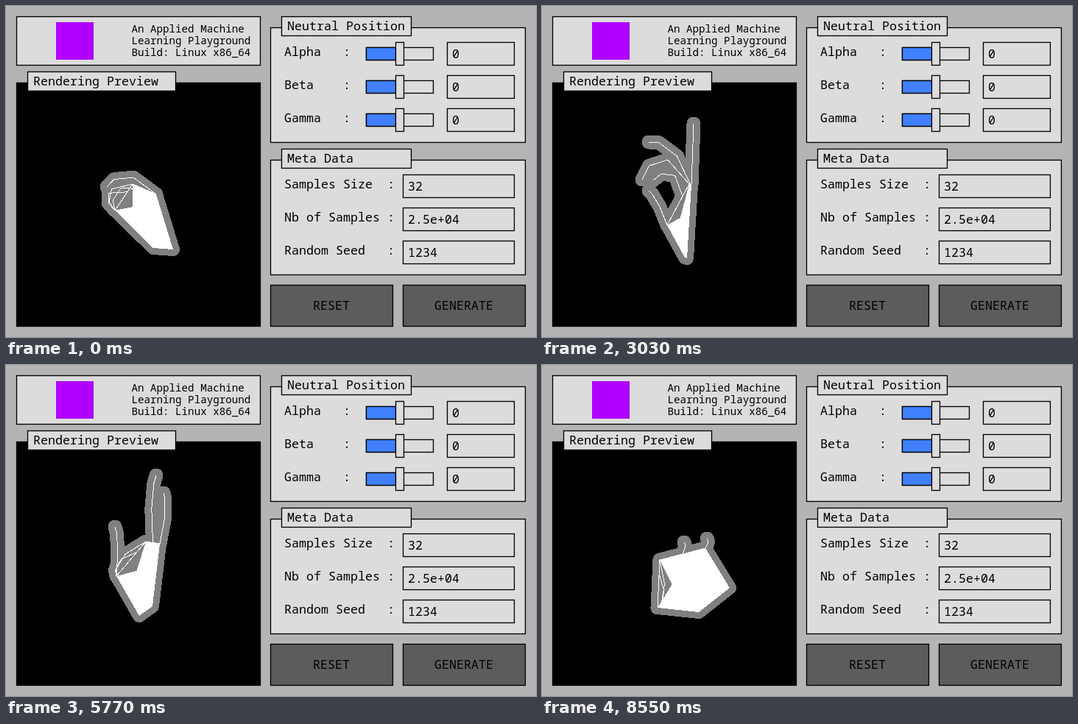
These frames come from a looping animation (720 px wide and 450 px high, 8.65 s). An HTML page:

```html
<!DOCTYPE html>
<html lang="en">
<head>
<meta charset="utf-8">
<title>Hand preview</title>
<style>
  html, body { margin: 0; width: 100%; height: 100%; overflow: hidden; background: #b4b4b4; }
  svg { display: block; }
  text { font: 16.67px "Noto Sans Mono", "DejaVu Sans Mono", monospace; white-space: pre; }
  .small { font-size: 14.2px; }
  .mid { text-anchor: middle; }
  .box { stroke: #000; stroke-width: 1.33; }
  #hand path { stroke-linejoin: round; stroke-linecap: round; shape-rendering: crispEdges; }
</style>
</head>
<body>
<svg width="720" height="450" viewBox="0 0 720 450">
  <g id="ui"></g>
  <g id="hand">
    <path id="halo" fill="#808080" stroke="#808080" stroke-width="18"/>
    <path id="reach" fill="none" stroke="#808080" stroke-width="19"/>
    <path id="palm" fill="#fff"/>
    <path id="bones" fill="none" stroke="#fff"/>
  </g>
  <g id="front"></g>
</svg>
<script>
const PANEL = '#dcdcdc', BLUE = '#4080ff', BUTTON = '#5c5c5c';
const LOOP = 8650, LAST = 8550, STEPS = 212, CENTRE = [180, 270];
const $ = id => document.getElementById(id);

// Interface

const box = (x, y, w, h, fill = PANEL) =>
  `<rect class="box" x="${x + .5}" y="${y + .5}" width="${w}" height="${h}" fill="${fill}"/>`;
const text = (x, y, s, cls = '') => `<text x="${x}" y="${y}" class="${cls}">${s}</text>`;
const title = (x, y, w, s) => box(x, y, w, 26) + text(x + 8, y + 19, s);
const field = (x, y, w, s) => box(x, y, w, 31) + text(x + 7, y + 22, s);

let ui = box(14, 14, 331, 66) + '<rect x="68" y="22" width="51" height="51" fill="#b000ff"/>';
['An Applied Machine', 'Learning Playground', 'Build: Linux x86_64'].forEach((s, i) =>
  ui += text(170.5, 36 + 16 * i, s, 'small'));
ui += box(14, 104, 331, 331, '#000');

ui += box(359, 29, 346, 156) + title(374, 14, 176, 'Neutral Position');
['Alpha', 'Beta', 'Gamma'].forEach((s, i) => {
  const y = 49 + 45 * i;
  ui += text(378, y + 19, s.padEnd(8) + ':') + box(489, y + 7, 91, 17) +
    box(489, y + 7, 40, 17, BLUE) + box(529, y, 11, 31) + field(599, y, 91, '0');
});

ui += box(359, 209, 346, 156) + title(374, 194, 176, 'Meta Data');
[['Samples Size', '32'], ['Nb of Samples', '2.5e+04'], ['Random Seed', '1234']].forEach(([s, v], i) => {
  const y = 229 + 45 * i;
  ui += text(378, y + 19, s.padEnd(14) + ':') + field(539, y, 151, v);
});

['RESET', 'GENERATE'].forEach((s, i) => {
  const x = 359 + 180 * i;
  ui += box(x, 379, 166, 56, BUTTON) + text(x + 83, 413, s, 'mid');
});
$('ui').innerHTML = ui;
$('front').innerHTML = title(29, 89, 201, 'Rendering Preview');

// Hand

const add = (p, q, k = 1) => [p[0] + q[0] * k, p[1] + q[1] * k];
const sub = (p, q) => add(p, q, -1);
const lerp = (p, q, k) => add(p, sub(q, p), k);
const spin = ([x, y], a) => [x * Math.cos(a) - y * Math.sin(a), x * Math.sin(a) + y * Math.cos(a)];
const unit = ([x, y]) => {
  const len = Math.hypot(x, y) || 1;
  return [x / len, y / len];
};

// Three bones from base to tip, bowed to one side.
function finger(base, tip, bow) {
  const side = spin(unit(sub(tip, base)), Math.PI / 2);
  return [base, add(lerp(base, tip, .5), side, bow),
    add(lerp(base, tip, .88), side, bow * .65), tip];
}

// Corners: both sides of the wrist, then the low, middle and high knuckle.
// Fingers by place: [tip x, tip y, bow]; the others curl back to the low knuckle.
// Points are kept with the wrist turned to the positive x axis.
function pose(corners, curl, fingers) {
  const [w1, w2, low, mid, high] = corners.split(' ').map(s => s.split(',').map(Number));
  const edge = lerp(low, mid, .5);
  const notch = add(edge, unit(sub(w1, edge)), 18);
  const bases = [low, lerp(low, mid, .7), mid, lerp(mid, high, .5), high];
  const chains = bases.flatMap((base, i) => {
    const [x, y, bow] = fingers[i] || [...low, curl];
    return finger(base, [x, y], bow);
  });
  const [wx, wy] = sub(lerp(w1, w2, .5), CENTRE);
  const angle = Math.atan2(wy, wx);
  const pts = [w1, w2, low, notch, mid, high, ...chains];
  return { angle, pts: pts.map(p => spin(sub(p, CENTRE), -angle)) };
}

const closed = pose('227,331 200,329 148,278 172,242 204,256', 20, { 4: [137, 246, 18] });
const flat = pose('262,268 241,290 197,295 158,288 163,281', 0,
  { 0: [194, 309, 15], 1: [184, 334, 19], 2: [144, 354, 25], 3: [78, 313, 3] });
const pinch = pose('197,343 194,342 170,298 200,242 203,243', 0,
  { 0: [145, 251, 3], 1: [151, 237, 20], 2: [136, 236, 30], 3: [145, 185, 14], 4: [206, 160, 0] });
const horns = pose('200,338 153,327 151,262 189,235 238,270', 0,
  { 0: [179, 205, 0], 1: [192, 196, 0], 2: [190, 196, 3], 3: [215, 221, 3], 4: [264, 196, -4] });
const upright = pose('199,328 181,341 150,287 190,240 209,243', 10,
  { 0: [148, 220, 3], 3: [204, 150, -4], 4: [214, 174, 4] });
const claw = pose('233,328 203,318 179,291 168,250 178,246', 25,
  { 3: [106, 254, 18], 4: [109, 205, 8] });
const facing = pose('255,303 213,336 157,330 160,265 222,249', -8,
  { 3: [193, 241, 2], 4: [224, 236, 2] });

// time, pose, extra turn in degrees
const keys = [
  [0, closed, 0], [1140, flat, 0], [1780, flat, -4], [3030, pinch, 0], [3650, claw, -18],
  [4600, horns, 0], [5100, upright, 40], [5770, upright, 0], [6260, upright, -35],
  [6800, pinch, 8], [7500, claw, 0], [7800, claw, -18], [LAST, facing, 0]
];

function handAt(t) {
  const i = Math.max(1, keys.findIndex(k => t <= k[0]));
  const [t0, a, turnA] = keys[i - 1], [t1, b, turnB] = keys[i];
  const u = (t - t0) / (t1 - t0), k = u * u * (3 - 2 * u);
  const from = a.angle + turnA * Math.PI / 180, to = b.angle + turnB * Math.PI / 180;
  const angle = from + (to - from) * k;
  return a.pts.map((p, j) => add(spin(lerp(p, b.pts[j], k), angle), CENTRE));
}

const line = pts => 'M' + pts.map(p => p.map(v => v.toFixed(1))).join('L');

function draw(t) {
  const pts = handAt(t), palm = line(pts.slice(0, 6)) + 'Z';
  const chains = [6, 10, 14, 18, 22].map(i => pts.slice(i, i + 4));
  const bones = chains.map(line).join('') + line(chains.map(c => c[0]));
  $('halo').setAttribute('d', palm);
  $('palm').setAttribute('d', palm);
  $('reach').setAttribute('d', bones);
  $('bones').setAttribute('d', bones);
}

function tick() {
  const t = performance.now() % LOOP;
  draw(Math.min(STEPS, Math.floor(t * STEPS / LAST)) * LAST / STEPS);
  requestAnimationFrame(tick);
}
tick();
</script>
</body>
</html>
```
